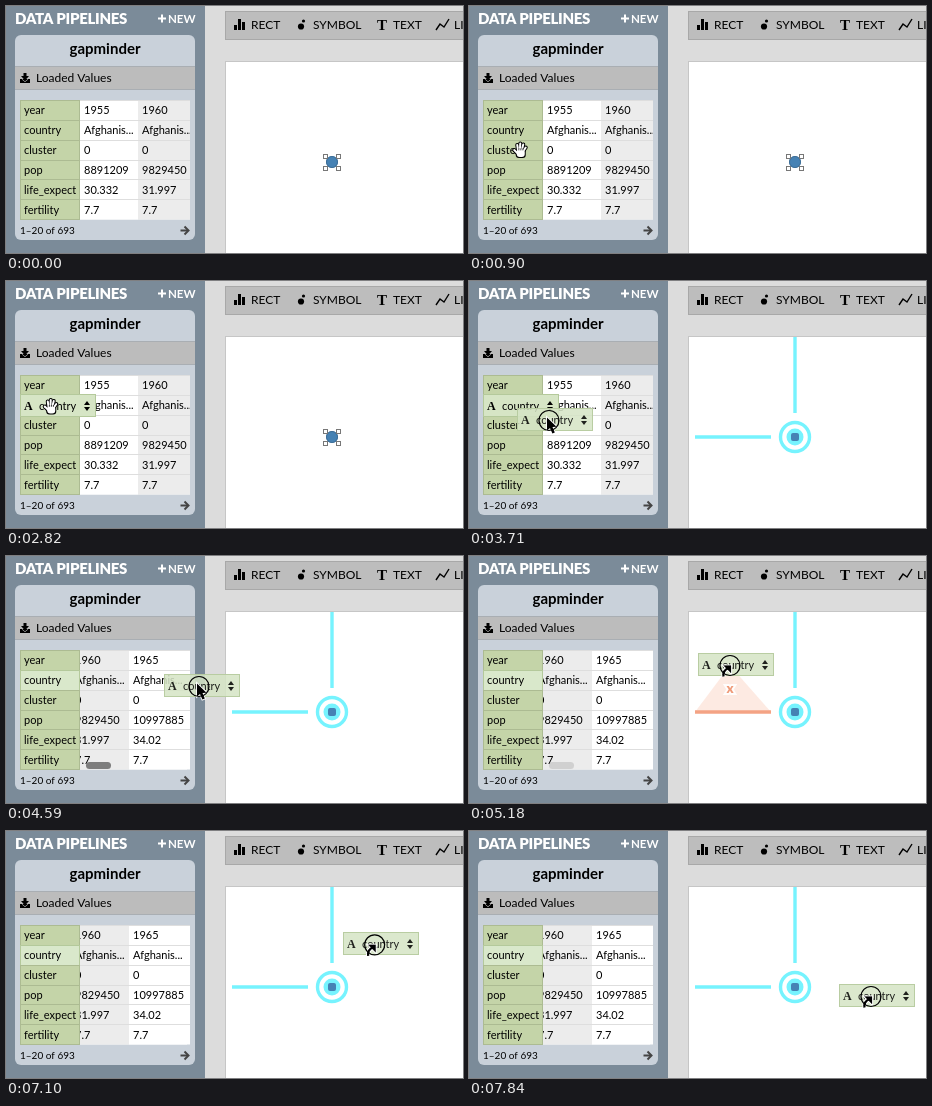
Animation of 457 by 247 pixels, one loop 7990 ms. Source, as an HTML page with a canvas:

```html
<!DOCTYPE html>
<html lang="en">
<head>
<meta charset="utf-8">
<title>Data pipeline drag</title>
<style>
html, body { margin: 0; width: 100%; height: 100%; overflow: hidden; background: #dcdcdc; }
canvas { display: block; width: 457px; height: 247px; }
</style>
</head>
<body>
<canvas id="stage" width="457" height="247"></canvas>
<script>
const ctx = document.getElementById('stage').getContext('2d');
const LOOP = 7990, STEPS = 54;
const CYAN = '#76f3fe', ORANGE = '#f4a384', INK = '#000';
const ROW_TOP = 94, ROW_H = 19.85, COL_W = 58, TABLE_X = 74, SCROLL = 67;

const fields = ['year', 'country', 'cluster', 'pop', 'life_expect', 'fertility'];
const columns = [
  ['1955', 'Afghanis...', '0', '8891209', '30.332', '7.7'],
  ['1960', 'Afghanis...', '0', '9829450', '31.997', '7.7'],
  ['1965', 'Afghanis...', '0', '10997885', '34.02', '7.7']
];

// Each key is [step, x, y]
const handPath = [[2, 79, 124], [5, 50, 134], [9, 23, 140], [11, 23, 140],
  [12, 27, 119], [15, 33, 117], [16, 33, 117], [20, 38, 117]];
const dragPath = [[24, 40, 125], [25, 48, 128], [28, 98, 134], [29, 98, 134],
  [30, 128, 128], [31, 158, 119], [35, 229, 98], [37, 234, 96], [39, 234, 96],
  [43, 234, 71], [44, 234, 71], [50, 388, 118], [51, 388, 118], [52, 380, 140], [53, 370, 154]];

function along(path, step) {
  const next = path.findIndex(key => key[0] >= step);
  if (next < 0) return path[path.length - 1].slice(1);
  if (next === 0) return path[0].slice(1);
  const [s0, x0, y0] = path[next - 1], [s1, x1, y1] = path[next];
  const k = (step - s0) / (s1 - s0);
  return [x0 + (x1 - x0) * k, y0 + (y1 - y0) * k];
}

function rect(x, y, w, h, fill, stroke) {
  ctx.fillStyle = fill;
  ctx.fillRect(x, y, w, h);
  if (stroke) {
    ctx.strokeStyle = stroke;
    ctx.lineWidth = 1;
    ctx.strokeRect(x + .5, y + .5, w - 1, h - 1);
  }
}

function round(x, y, w, h, r, fill) {
  ctx.beginPath();
  ctx.roundRect(x, y, w, h, r);
  ctx.fillStyle = fill;
  ctx.fill();
}

function text(str, x, y, size = 11, color = INK, weight = 400, align = 'left') {
  ctx.font = `${weight} ${size}px Lato, sans-serif`;
  ctx.textAlign = align;
  ctx.fillStyle = color;
  ctx.fillText(str, x, y);
}

function serif(str, x, y, size) {
  ctx.font = `bold ${size}px "Liberation Serif", serif`;
  ctx.textAlign = 'left';
  ctx.fillStyle = INK;
  ctx.fillText(str, x, y);
}

function trace(points, closed) {
  ctx.beginPath();
  points.forEach(([x, y]) => ctx.lineTo(x, y));
  if (closed) ctx.closePath();
}

function shape(points, fill) {
  trace(points, true);
  ctx.fillStyle = fill;
  ctx.fill();
}

function line(points, color, width) {
  trace(points);
  ctx.strokeStyle = color;
  ctx.lineWidth = width;
  ctx.stroke();
}

function disc(x, y, r, fill) {
  ctx.beginPath();
  ctx.arc(x, y, r, 0, Math.PI * 2);
  ctx.fillStyle = fill;
  ctx.fill();
}

function ring(x, y, r, color, width) {
  ctx.beginPath();
  ctx.arc(x, y, r, 0, Math.PI * 2);
  ctx.strokeStyle = color;
  ctx.lineWidth = width;
  ctx.stroke();
}

function drawSidebar() {
  rect(0, 0, 199, 247, '#7b8b99');
  ctx.letterSpacing = '-0.3px';
  text('DATA PIPELINES', 9, 18, 15, '#fff', 900);
  ctx.letterSpacing = '0px';
  rect(152, 11.5, 8, 2, '#fff');
  rect(155, 8.5, 2, 8, '#fff');
  text('NEW', 162, 17, 11.5, '#fff', 700);

  round(9, 29, 180, 205, 6, '#c9d1da');
  text('gapminder', 99, 48, 15, INK, 700, 'center');
  rect(9, 61, 180, 22, '#bcbcbc');
  rect(9, 60, 180, 1, '#a9aeb3');
  rect(9, 83, 180, 1, '#a9aeb3');
  rect(14, 73, 10, 4, INK);
  rect(17.5, 67, 3, 4, INK);
  shape([[15, 70], [23, 70], [19, 74.5]], INK);
  line([[16, 73.2], [19, 75.8], [22, 73.2]], '#bcbcbc', .7);
  text('Loaded Values', 30, 76, 12);

  text('1–20 of 693', 14, 228, 10);
  line([[174.5, 224.5], [182, 224.5]], '#444', 2);
  line([[178.5, 220.5], [182.5, 224.5], [178.5, 228.5]], '#444', 2);
}

function drawTable(step) {
  const scroll = step < 30 ? 0 : step === 30 ? SCROLL / 2 : SCROLL;
  ctx.save();
  ctx.beginPath();
  ctx.rect(TABLE_X - 1, ROW_TOP, 111, 119.5);
  ctx.clip();
  rect(TABLE_X, ROW_TOP, 110, 120, '#fff');
  columns.forEach((values, c) => {
    const x = TABLE_X + c * COL_W - scroll;
    rect(x, ROW_TOP, COL_W, 120, c % 2 ? '#ececec' : '#fff');
    values.forEach((value, r) => {
      const y = ROW_TOP + r * ROW_H;
      rect(x, Math.round(y), COL_W + 4, 1, '#dedede');
      text(value, x + 4, Math.round(y + 14.3));
    });
  });
  const thumb = step < 30 || step > 36 ? 0 : step < 34 ? 1 : step === 34 ? .55 : step === 35 ? .25 : .1;
  if (thumb) {
    ctx.globalAlpha = thumb;
    round(step === 30 ? 77 : 80, 206, 25, 7, 3.5, '#7d7d7d');
  }
  ctx.restore();

  fields.forEach((name, r) => {
    const top = ROW_TOP + r * ROW_H;
    const y = Math.round(top);
    const h = Math.round(top + ROW_H) - y + 1;
    const lit = r === 1 && step >= 30;
    rect(14, y, 60, h, lit ? '#d9e8cb' : '#c4d4a8', lit ? '#b4c99b' : '#acbb92');
    text(name, 18, Math.round(top + 14.3));
  });
  if (step >= 12 && step < 30) drawPill(14, 114);
}

function drawPill(x, y, alpha = 1) {
  ctx.save();
  ctx.translate(Math.round(x), Math.round(y));
  ctx.globalAlpha = alpha;
  rect(0, -1, 76, 23, '#d6e5c5', '#b4c99b');
  serif('A', 4, 15, 12);
  text('country', 19, 15);
  shape([[64, 10], [70, 10], [67, 6]], INK);
  shape([[64, 12], [70, 12], [67, 16]], INK);
  ctx.restore();
}

function drawToolbar() {
  rect(199, 0, 258, 247, '#dcdcdc');
  rect(219, 5, 240, 29, '#bdbdbd', '#a8a8a8');
  [[228, 5], [232, 11], [236, 8]].forEach(([x, h]) => rect(x, 24 - h, 3, h, INK));
  text('RECT', 245, 23, 12);
  disc(295, 20.5, 3.1, INK);
  disc(297.5, 15, 1.6, INK);
  text('SYMBOL', 307, 23, 12);
  serif('T', 371, 24, 15);
  text('TEXT', 387, 23, 12);
  line([[430, 24], [434, 18], [438, 21], [443, 13]], INK, 1.4);
  text('LINE', 448, 23, 12);
  rect(219, 55, 240, 193, '#fff', '#c6c6c6');
}

function drawSelection() {
  disc(326, 156, 6, '#4682b4');
  ring(326, 156, 5.5, '#3d6d96', 1);
  for (const x of [317, 330]) for (const y of [148, 160]) rect(x, y, 5, 5, '#fff', '#777');
}

function drawZone(ends, hot, cursor, label) {
  if (hot) shape([cursor, ...ends], 'rgba(244,163,132,.23)');
  line(ends, hot ? ORANGE : CYAN, 3.4);
  if (!hot) return;
  const [x, y] = cursor;
  ctx.font = '900 13px Lato, sans-serif';
  ctx.textAlign = 'center';
  ctx.strokeStyle = 'rgba(255,255,255,.9)';
  ctx.lineWidth = 4;
  ctx.strokeText(label, x, y + 27);
  text(label, x, y + 27, 13, '#ef9a78', 900, 'center');
}

function drawDropZones(step, cursor) {
  drawZone([[226, 156], [302, 156]], step >= 34 && step <= 41, cursor, 'x');
  drawZone([[326, 56], [326, 132]], step >= 42 && step <= 45, cursor, 'y');
  ring(326, 156, 14.5, CYAN, 3.4);
  disc(326, 156, 8.5, CYAN);
  round(322, 152, 8, 8, 2, '#4682b4');
}

function drawHand(x, y) {
  const fingers = [[5, 3.5], [8, 2], [11, 3], [13.5, 6]];
  ctx.save();
  ctx.translate(x, y);
  ctx.lineCap = 'round';
  for (const [color, grow] of [[INK, 1], ['#fff', 0]]) {
    fingers.forEach(([fx, fy], i) => line([[fx, fy], [6 + i * 1.6, 10]], color, 2 + grow * 2));
    line([[2, 8.5], [6, 12.5]], color, 2 + grow * 2);
    round(4.5 - grow, 8 - grow, 8 + grow * 2, 7.5 + grow * 2, 3, color);
  }
  for (const fx of [6.6, 8.6, 10.6]) line([[fx, 7], [fx, 8.5]], INK, .7);
  ctx.restore();
}

function drawArrow(x, y) {
  const points = [[0, 0], [0, 13], [3, 10.4], [5.4, 16], [7.8, 15], [5.5, 9.5], [9.5, 9.3]]
    .map(([px, py]) => [x + px, y + py]);
  trace(points, true);
  ctx.strokeStyle = '#fff';
  ctx.lineWidth = 1.8;
  ctx.stroke();
  shape(points, INK);
}

function drawLinkArrow(x, y) {
  const head = [[1, 0], [1, 7.5], [-6.5, 0]].map(([px, py]) => [x + px, y + py]);
  for (const [color, grow] of [['#fff', 2], [INK, 0]]) {
    ctx.beginPath();
    ctx.moveTo(x - 1.5, y + 2.5);
    ctx.quadraticCurveTo(x - 7.5, y + 5, x - 6.5, y + 11);
    ctx.strokeStyle = color;
    ctx.lineWidth = 2.2 + grow;
    ctx.stroke();
    trace(head, true);
    ctx.lineWidth = .2 + grow;
    ctx.stroke();
    shape(head, color);
  }
}

function drawPress(x, y) {
  ring(x, y, 10, INK, 1.2);
}

function draw(step) {
  drawToolbar();
  drawSidebar();
  drawTable(step);

  if (step < 24) {
    drawSelection();
    if (step < 2) return;
    const [x, y] = along(handPath, step);
    drawHand(x, y);
    if (step >= 22) drawPress(46.5, 124.5);
    return;
  }

  const [x, y] = along(dragPath, step);
  const lag = step === 30 || step === 31 ? 3 : 0;
  const cursor = [x + 32 + lag, y + 11.5];
  drawDropZones(step, cursor);
  drawPill(x, y, .86);
  if (cursor[0] < 220) drawArrow(cursor[0] - 2, cursor[1] - 3);
  else drawLinkArrow(...cursor);
  drawPress(...cursor);
}

function tick() {
  const time = performance.now() % LOOP;
  // Small lead keeps the rounded change times on the right side of each step.
  draw(Math.min(STEPS - 1, Math.floor((time + 6) / LOOP * STEPS)));
  requestAnimationFrame(tick);
}
tick();
</script>
</body>
</html>
```
